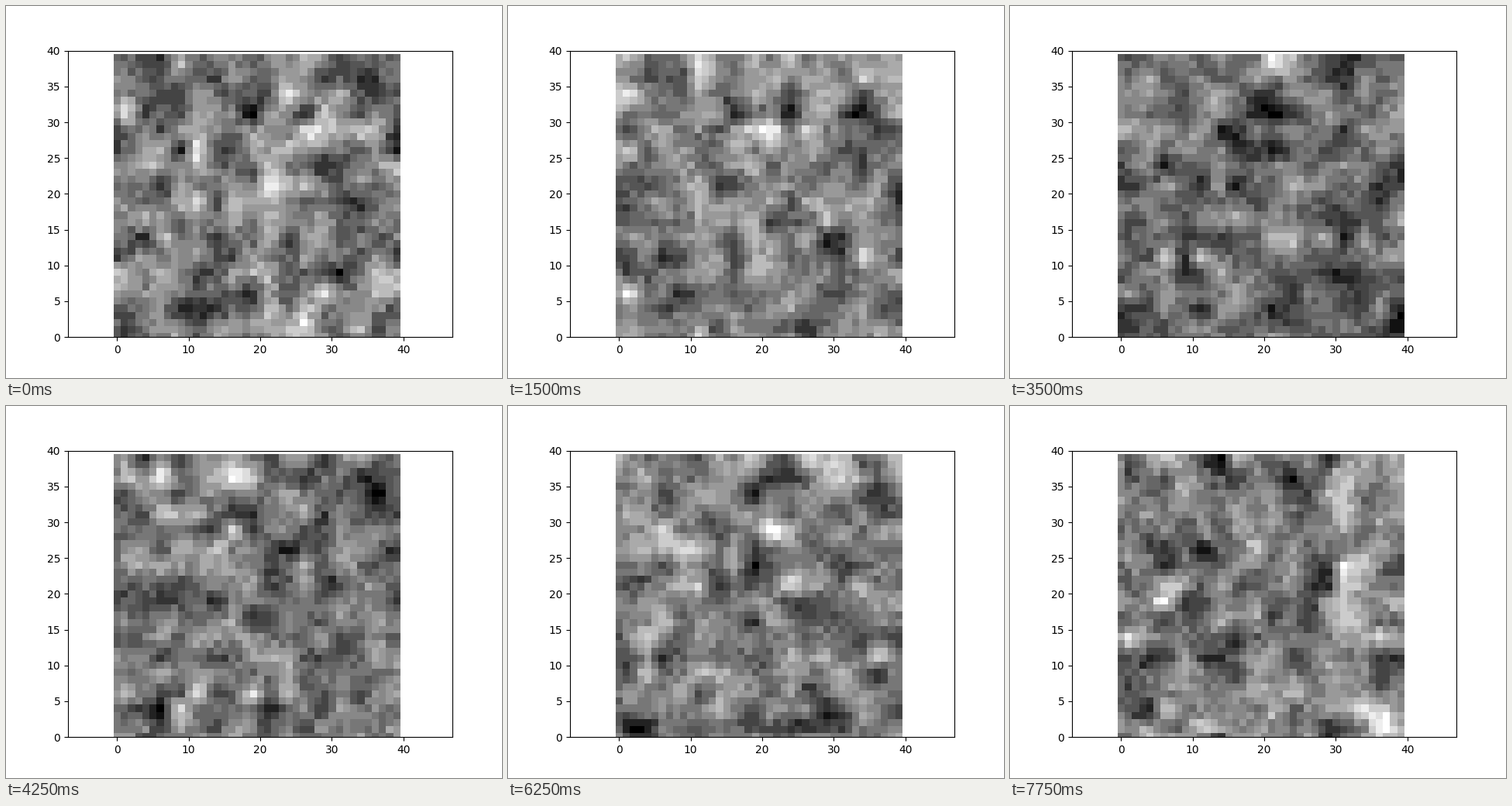
Recreate the animation shown at these times as a matplotlib script. Size 640 px wide and 480 px high, loop 8 s.

```python
import numpy as np
import matplotlib.pyplot as plt
from matplotlib.animation import FuncAnimation

SIZE = 40
NODES = 16
STEPS = 32
INTERVAL = 250
LEVELS = 16
GRAIN = 0.25


def node_weights():
    """Linear blend of coarse nodes for each cell, wrapping at the edges."""
    spacing = SIZE / NODES
    cells = np.arange(SIZE)[:, None]
    centres = (np.arange(NODES) + 0.5) * spacing
    gap = np.abs(cells - centres)
    gap = np.minimum(gap, SIZE - gap)
    return np.clip(1 - gap / spacing, 0, None)


WEIGHTS = node_weights()


def make_field(step):
    """Blotchy random field, scaled from black to white."""
    rng = np.random.default_rng(100 + step)
    coarse = rng.normal(size=(NODES, NODES))
    field = WEIGHTS @ coarse @ WEIGHTS.T
    field += GRAIN * rng.normal(size=(SIZE, SIZE))
    field = (field - field.min()) / np.ptp(field)
    return np.round(field * (LEVELS - 1)) / (LEVELS - 1)


fig, ax = plt.subplots(figsize=(6.4, 4.8), dpi=100)
image = ax.imshow(make_field(0), cmap="gray", vmin=0, vmax=1,
                  origin="lower", interpolation="nearest")
ax.set_xlim(0, SIZE)
ax.set_ylim(0, SIZE)
ax.set_aspect("equal", adjustable="datalim")


def draw(step):
    image.set_data(make_field(step))
    return [image]


anim = FuncAnimation(fig, draw, frames=STEPS, interval=INTERVAL,
                     repeat=True, repeat_delay=0)
plt.show()
```
